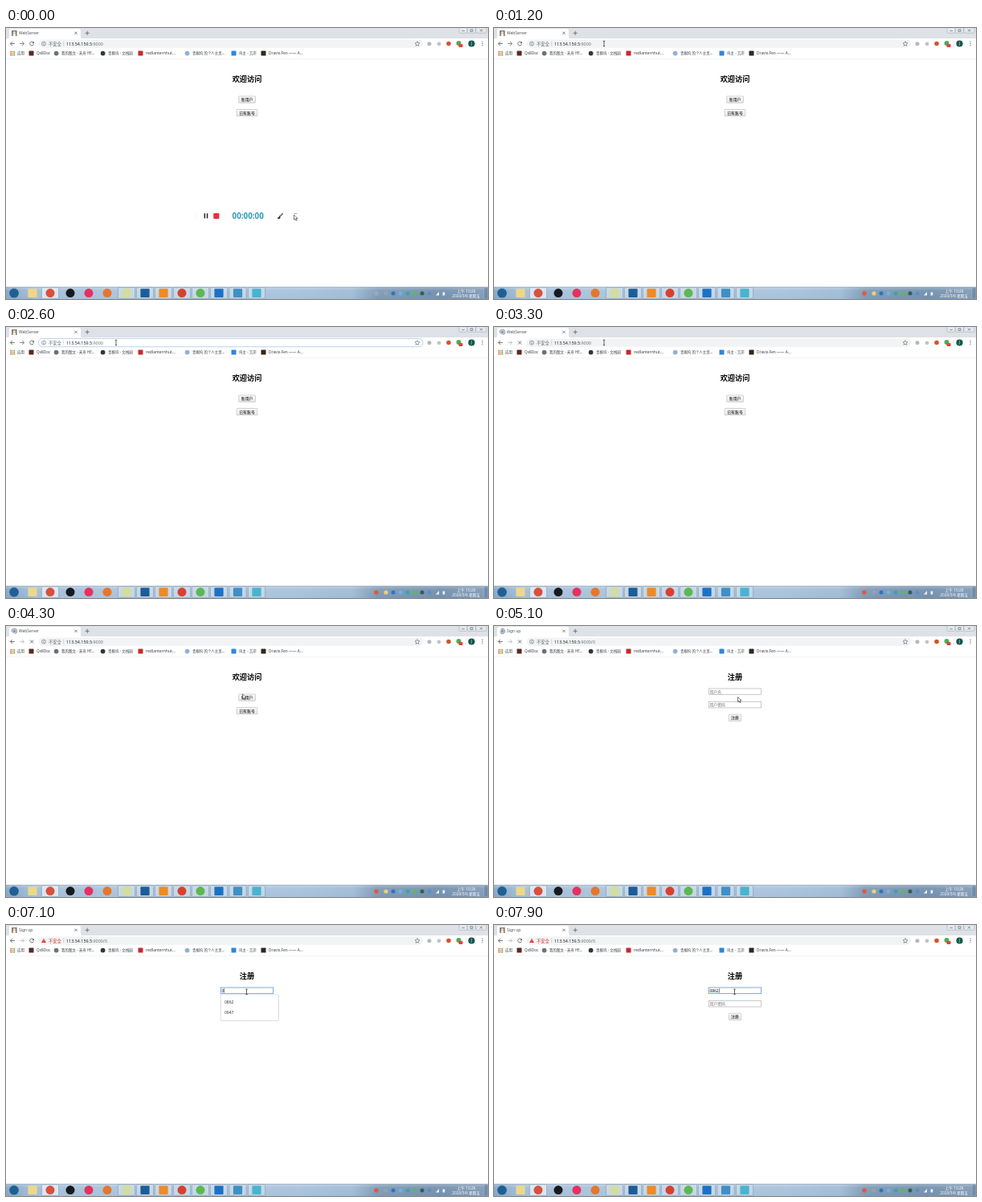
Recreate the animation shown at these times as an HTML page. Size 600 by 338 pixels, loop 8 s.

```html
<!DOCTYPE html>
<html lang="zh-CN">
<head>
<meta charset="utf-8">
<title>WebServer</title>
<style>
html, body { margin: 0; width: 100%; height: 100%; overflow: hidden; background: #fff; }
svg { display: block; width: 100vw; height: 100vh; }
text { font-family: "Noto Sans", "Noto Sans CJK SC", "Noto Sans CJK", sans-serif; white-space: pre; }
</style>
</head>
<body>
<svg id="stage" viewBox="0 0 600 338" preserveAspectRatio="none"></svg>
<script>
const LOOP = 8000;
const stage = document.getElementById('stage');

// Markup helpers
const attrs = o => Object.entries(o).map(([k, v]) => ` ${k}="${v}"`).join('');
const rect = (x, y, w, h, fill, o = {}) =>
  `<rect x="${x}" y="${y}" width="${w}" height="${h}" fill="${fill}"${attrs(o)}/>`;
const circle = (x, y, r, fill, o = {}) =>
  `<circle cx="${x}" cy="${y}" r="${r}" fill="${fill}"${attrs(o)}/>`;
const line = (d, color, width = 0.7, o = {}) =>
  `<path d="${d}" fill="none" stroke="${color}" stroke-width="${width}"${attrs(o)}/>`;
const text = (x, y, s, size, fill, o = {}) =>
  `<text x="${x}" y="${y}" font-size="${size}" fill="${fill}"${attrs(o)}>${s}</text>`;
const group = (id, body, o = {}) => `<g id="${id}"${attrs(o)}>${body}</g>`;
const mid = { 'text-anchor': 'middle' };

const button = (x, y, w, label) =>
  rect(x, y, w, 8.4, 'url(#btn)', { rx: 0.6, stroke: '#b9b9b9', 'stroke-width': 0.6 }) +
  text(x + w / 2, y + 6, label, 4.9, '#000', mid);
const heading = label =>
  text(300, 67.4, label, 9.2, '#000', { ...mid, 'font-weight': 700 });
const field = (id, y) =>
  rect(267.4, y, 65.2, 7.6, '#fff', { id, stroke: '#a6a6a6', 'stroke-width': 0.6 });

const defs = `<defs>
  <linearGradient id="btn" x2="0" y2="1"><stop stop-color="#fafafa"/><stop offset="1" stop-color="#e6e6e6"/></linearGradient>
  <linearGradient id="bar">
    <stop stop-color="#86a6c6"/><stop offset=".06" stop-color="#a3bed8"/>
    <stop offset=".3" stop-color="#adc6dd"/><stop offset=".6" stop-color="#a8c2db"/>
    <stop offset=".72" stop-color="#a0bbd5"/><stop offset=".77" stop-color="#7f9ab6"/>
    <stop offset=".9" stop-color="#7390ae"/><stop offset="1" stop-color="#829cb7"/>
  </linearGradient>
  <linearGradient id="sheen" x2="0" y2="1">
    <stop stop-color="#fff" stop-opacity=".3"/><stop offset=".3" stop-color="#fff" stop-opacity=".06"/>
    <stop offset="1" stop-color="#fff" stop-opacity="0"/>
  </linearGradient>
</defs>`;

function tabStrip() {
  const controls = [564, 574.5, 585].map((x, i) =>
    rect(x, -1, i == 2 ? 13 : 10, 7.3, '#e3e8ee', { rx: 1.2, stroke: '#a5afba', 'stroke-width': 0.6 })).join('');
  return rect(0, 0, 600, 13.2, '#dee1e6') +
    `<path d="M2 13.2Q4 13.2 4 11V3.4Q4 1 6.4 1H90.6Q93 1 93 3.4V11Q93 13.2 95 13.2Z" fill="#fff"/>` +
    group('favicon', rect(7, 3, 6.6, 7, '#8a7c6c') + circle(10.3, 5.4, 1.5, '#efe4d8') +
      rect(8.6, 7, 3.4, 3, '#f1ece6')) +
    group('loader', circle(10.4, 6.4, 3, '#c3cbd8') + circle(10.4, 6.4, 1.6, '#8b98ab') +
      line('M10.4 3.1A3.3 3.3 0 1 1 7.1 6.4', '#7e8da6', 0.8, { id: 'arc' })) +
    text(16, 8.2, 'WebServer', 4.9, '#4b5056', { id: 'title' }) +
    line('M85.4 4.7l3.2 3.2m0-3.2l-3.2 3.2M98.6 6.3h5.2M101.2 3.7v5.2', '#4c5157', 0.7) +
    controls +
    line('M567.5 3.6h3.2M578 1.8h3v2.6h-3zM590 1.6l3 3m0-3l-3 3', '#5f6b78', 0.7);
}

function toolbar() {
  return rect(0, 13.2, 600, 25.3, '#fff') +
    line('M10.8 19.5h-5.4m2.5-2.5l-2.5 2.5l2.5 2.5', '#51565c', 0.8) +
    line('M17.2 19.5h5.4m-2.5-2.5l2.5 2.5l-2.5 2.5', '#666b70', 0.8, { id: 'forward' }) +
    group('reload', line('M34.2 18A2.5 2.5 0 1 0 34.5 20.3', '#51565c', 0.8) +
      '<path d="M34.8 16.7v2.5h-2.5z" fill="#51565c"/>') +
    line('M30 17.4l4.2 4.2m0-4.2l-4.2 4.2', '#51565c', 0.8, { id: 'stop' }) +
    rect(40.4, 14.4, 478.6, 10.3, '#f1f3f4', { id: 'omni', rx: 5.1 }) +
    group('info', circle(47, 19.6, 2.5, 'none', { stroke: '#5f6368', 'stroke-width': 0.6 }) +
      rect(46.65, 19.2, 0.7, 1.9, '#5f6368') + rect(46.65, 18, 0.7, 0.7, '#5f6368')) +
    group('warn', '<path d="M47 16.7l2.9 5.2h-5.8z" fill="#d93025"/>' +
      rect(46.7, 18.5, 0.6, 1.6, '#fff') + rect(46.7, 20.6, 0.6, 0.6, '#fff')) +
    text(53, 21.5, '不安全', 5.3, '#5f6368', { id: 'unsafe' }) +
    rect(71.6, 16.6, 0.5, 6, '#b5b8bc') +
    rect(75, 15.8, 46.2, 7.6, '#2f7fd8', { id: 'selection' }) +
    `<text id="url" x="75" y="21.5" font-size="5.4"><tspan id="host">113.54.159.5</tspan><tspan id="path">:9000</tspan></text>` +
    rect(121.2, 16, 0.5, 7, '#444', { id: 'urlCaret' }) +
    '<path d="M512 16.6l.9 2 2.1.2-1.6 1.4.5 2.1-1.9-1.1-1.9 1.1.5-2.1-1.6-1.4 2.1-.2z" fill="none" stroke="#5f6368" stroke-width=".6"/>' +
    circle(527, 19.8, 2.5, '#b4b8bd') + circle(539, 19.8, 2.4, '#bfc3c7') +
    circle(551, 19.5, 2.8, '#d9512c') + circle(563.5, 19, 3, '#49ae58') +
    rect(563.5, 20, 5, 4, '#dc4537', { rx: 0.8 }) +
    rect(572.6, 15.8, 0.5, 7.6, '#d0d3d6') +
    circle(579.5, 19.5, 4.1, '#12584d') + text(579.5, 21.2, 'J', 4.6, '#fff', mid) +
    [17.2, 19.5, 21.8].map(y => circle(593, y, 0.65, '#5f6368')).join('');
}

function bookmarks() {
  const colors = ['#d9503f', '#e0a32e', '#4a9a54', '#4b83d6'];
  let out = '';
  for (let i = 0; i < 9; i++)
    out += rect(5.4 + i % 3 * 2.1, 28.8 + (i / 3 | 0) * 2.1, 1.5, 1.5, colors[(i + (i / 3 | 0)) % 4]);
  const items = [
    [14, '应用', 4.5],
    [38, 'Qv8Doc', 4.7, '#5a2a1e'],
    [69, '我的图文 - 禾舟 HE...', 4.5, '#6c7077', 1],
    [127, '青枫坞 - 文栈园', 4.5, '#33363a', 1],
    [174, 'redlanternhut...', 5, '#c8282d'],
    [232, '青枫坞 的个人主页...', 4.45, '#8fb0df', 1],
    [290, '坞主 - 言岸', 4.5, '#2f86dc'],
    [327, 'Dravix.Fen —— A...', 4.8, '#31261a']
  ];
  for (const [x, label, size, color, round] of items) {
    if (color) out += round ? circle(x - 6.4, 31.6, 2.9, color) : rect(x - 9.5, 28.6, 6, 6, color, { rx: 0.6 });
    out += text(x, 33.4, label, size, '#3a3e43');
  }
  return out + rect(0, 38.2, 600, 0.5, '#e4e6e8');
}

const home = () => group('home', heading('欢迎访问') +
  button(289.7, 85, 20.8, '新用户') + button(287.1, 101.5, 25.8, '已有账号'));

function signup() {
  return group('signup', heading('注册') +
    field('nameBox', 78) + field('passBox', 94.4) +
    text(268.4, 83.7, '用户名', 4.9, '#777', { id: 'name' }) +
    rect(268.2, 79, 0.5, 5.6, '#111', { id: 'nameCaret' }) +
    text(268.4, 100.1, '用户密码', 4.9, '#777') +
    button(292.2, 110.2, 15.6, '注册') +
    group('list',
      rect(267, 87.6, 73, 1, '#000', { id: 'listShade', opacity: 0.12, rx: 0.8 }) +
      rect(267.3, 87, 72, 1, '#fff', { id: 'listBox', stroke: '#c9ccd0', 'stroke-width': 0.5, rx: 0.6 }) +
      [0, 1, 2, 3, 4, 5].map(i => text(272, 97.8 + i * 13.5, '', 5, '#333', { class: 'item' })).join('')));
}

const recorder = () => group('recorder',
  rect(236, 225, 130, 18, '#fff') +
  [237, 272, 330].map(x => rect(x, 230, 0.4, 9, '#e6e8ea')).join('') +
  rect(246.6, 231.2, 1.5, 6.2, '#222') + rect(249.8, 231.2, 1.5, 6.2, '#222') +
  rect(258.2, 230.9, 7.2, 7.2, '#e5333b', { rx: 1.4 }) +
  text(301.2, 237.8, '00:00:00', 9.8, '#2d9dbd', { ...mid, 'font-weight': 700 }) +
  line('M344.8 231.2l-3.6 3.6M340.6 235.2a1.3 1.3 0 1 1-2 1.9q1.1-.2 2-1.9z', '#333', 1.3) +
  line('M344.6 231.5l-3.2 3.2', '#fff', 0.4) +
  rect(358, 231, 4.4, 0.7, '#888'));

function taskbar() {
  let out = rect(0, 323, 600, 15, 'url(#bar)') + rect(0, 323, 600, 15, 'url(#sheen)') +
    rect(0, 322.8, 600, 0.6, '#8196a9') +
    circle(10, 330.8, 6.2, '#215f93', { stroke: '#9cc0da', 'stroke-width': 0.6 });
  // x, colour, round, running
  const apps = [
    [33, '#edd88a'], [55, '#d9503c', 1, 1], [80, '#17191d', 1], [103, '#e5315f', 1], [126, '#e6762b', 1],
    [150, '#d3dda0', 0, 1], [173, '#1c5d98', 0, 1], [196, '#f08a24', 0, 1], [219, '#d8412f', 1, 1],
    [242, '#5cb850', 1, 1], [265, '#1c71c4', 0, 1], [288.5, '#3f8fc6', 0, 1], [312, '#48b4d0', 0, 1]
  ];
  for (const [x, color, round, running] of apps) {
    if (running) out += rect(x - 10.6, 323.8, 21.2, 13.8, '#fff',
      { 'fill-opacity': x == 55 ? 0.6 : 0.3, rx: 1, stroke: '#64809c', 'stroke-opacity': 0.8, 'stroke-width': 0.5 });
    out += round ? circle(x, 330.6, 5.5, color) : rect(x - 5.6, 325.2, 11.2, 10.8, color, { rx: 1 });
  }
  out += circle(461, 331, 2.8, '#dd5b3d', { id: 'tray' }) + circle(473, 331, 2.6, '#ead179', { id: 'flash' });
  ['#2f74c4', '#6fb3d8', '#39a5a8', '#62b558', '#365f4d', '#5d8fc4'].forEach((c, i) =>
    out += circle(482 + i * 9, 331, 2.5, c));
  return out + '<path d="M535 333.5l4-4.4v4.4zM543.6 329.4h2.6v4.2h-2.6z" fill="#f1f5f8"/>' +
    text(573, 329.5, '上午 10:26', 4.8, '#fff', mid) +
    text(572.8, 336.1, '2020/3/6 星期五', 4.7, '#fff', mid) +
    rect(595, 323.4, 5, 14.6, '#5f7c99', { 'fill-opacity': 0.5, stroke: '#b7c8d6', 'stroke-width': 0.4 });
}

const pointers =
  '<path id="arrow" d="M0 0v6.2l1.5-1.3 1 2.3 1-.4-1-2.3h2z" fill="#fff" stroke="#222" stroke-width=".6"/>' +
  line('M-1.2 -3.2H1.2M0 -3.2V3.2M-1.2 3.2H1.2', '#222', 0.7, { id: 'beam' });

stage.innerHTML = defs + rect(0, 0, 600, 338, '#fff') + tabStrip() + toolbar() + bookmarks() +
  home() + signup() + recorder() + taskbar() + pointers;

const el = {};
stage.querySelectorAll('[id]').forEach(n => el[n.id] = n);
const items = [...stage.querySelectorAll('.item')];

// Timing tables
const path = [
  [0, 358.5, 233], [300, 358.5, 233], [1000, 137, 19.5], [3700, 137, 19.5],
  [4400, 303.5, 88.5], [5499, 303.5, 88.5], [5500, 299.5, 83.3], [LOOP, 299.5, 83.3]
];
const flips = [1000, 1500, 1800, 2200, 2600, 3000, 3400, 3700, 4100, 4400, 4800, 5500, 5900, 6300, 6600, 7000, 7400, 7700];
const keys = [6900, 7200, 7500, 7800];
const typed = '0862';
const users = ['4715', typed, '0947', '4713', 'kep', '219'];

const within = (t, a, b) => t >= a && t < b;
const show = (node, on) => node.setAttribute('visibility', on ? 'inherit' : 'hidden');
const set = (node, o) => { for (const k in o) node.setAttribute(k, o[k]); };
const ease = p => p * p * (3 - 2 * p);

function pointerAt(t) {
  const i = Math.max(1, path.findIndex(p => p[0] > t));
  const [t0, x0, y0] = path[i - 1], [t1, x1, y1] = path[i];
  const p = ease((t - t0) / (t1 - t0));
  return [x0 + (x1 - x0) * p, y0 + (y1 - y0) * p];
}

function drawBrowser(t, onSignup) {
  const loading = within(t, 2900, 5400);
  const focus = within(t, 1500, 2900);
  const selected = within(t, 1500, 1800);
  const alert = t >= 7000;
  el.title.textContent = onSignup ? 'Sign up' : 'WebServer';
  el.path.textContent = onSignup ? ':9000/0' : ':9000';
  show(el.loader, loading);
  show(el.favicon, !loading);
  set(el.arc, { transform: `rotate(${-t * 0.36} 10.4 6.4)` });
  show(el.stop, loading);
  show(el.reload, !loading);
  set(el.forward, { stroke: t < 2900 ? '#666b70' : '#b4b8bc' });
  set(el.omni, { fill: focus ? '#fff' : '#f1f3f4', stroke: focus ? '#a9c8ec' : 'none', 'stroke-width': 0.8 });
  show(el.info, !alert);
  show(el.warn, alert);
  set(el.unsafe, { fill: alert ? '#d93025' : '#5f6368' });
  show(el.selection, selected);
  set(el.host, { fill: selected ? '#fff' : '#25282c' });
  set(el.path, { fill: selected ? '#fff' : '#6a6f75' });
  show(el.urlCaret, within(t, 1800, 2400));
}

function drawForm(t) {
  const focus = t >= 5800;
  const value = typed.slice(0, keys.filter(k => t >= k).length);
  const matches = users.filter(u => u.startsWith(value));
  const h = matches.length * 13.5 + 5.2;
  set(el.nameBox, { stroke: focus ? '#6f9fe0' : '#a6a6a6', 'stroke-width': focus ? 0.9 : 0.6 });
  el.name.textContent = value || '用户名';
  set(el.name, { fill: value ? '#111' : '#777' });
  set(el.nameCaret, { x: 268.2 + value.length * 2.82 + (value ? 0.5 : 0) });
  show(el.nameCaret, focus && !within(t, 6400, 6900));
  show(el.list, within(t, 6200, 7900));
  set(el.listBox, { height: h });
  set(el.listShade, { height: h });
  items.forEach((n, i) => n.textContent = matches[i] || '');
}

function draw(t) {
  const onSignup = t >= 4900;
  show(el.home, !onSignup);
  set(el.signup, { display: onSignup ? 'inline' : 'none' });
  drawBrowser(t, onSignup);
  drawForm(t);

  const out = Math.min(1, Math.max(0, (t - 100) / 300));
  set(el.recorder, { opacity: 1 - out, transform: `translate(0 ${out * out * 30})` });
  set(el.tray, { fill: t < 400 ? '#9aa9ba' : '#dd5b3d' });
  set(el.flash, { opacity: flips.filter(f => t >= f).length % 2 ? 1 : 0.15 });

  const [x, y] = pointerAt(t);
  const beam = within(t, 1000, 3750) || t >= 5500;
  set(beam ? el.beam : el.arrow, { transform: `translate(${x} ${y})` });
  show(el.beam, beam);
  show(el.arrow, !beam);
}

const start = performance.now();
function tick() {
  draw((performance.now() - start) % LOOP);
  requestAnimationFrame(tick);
}
tick();
</script>
</body>
</html>
```
